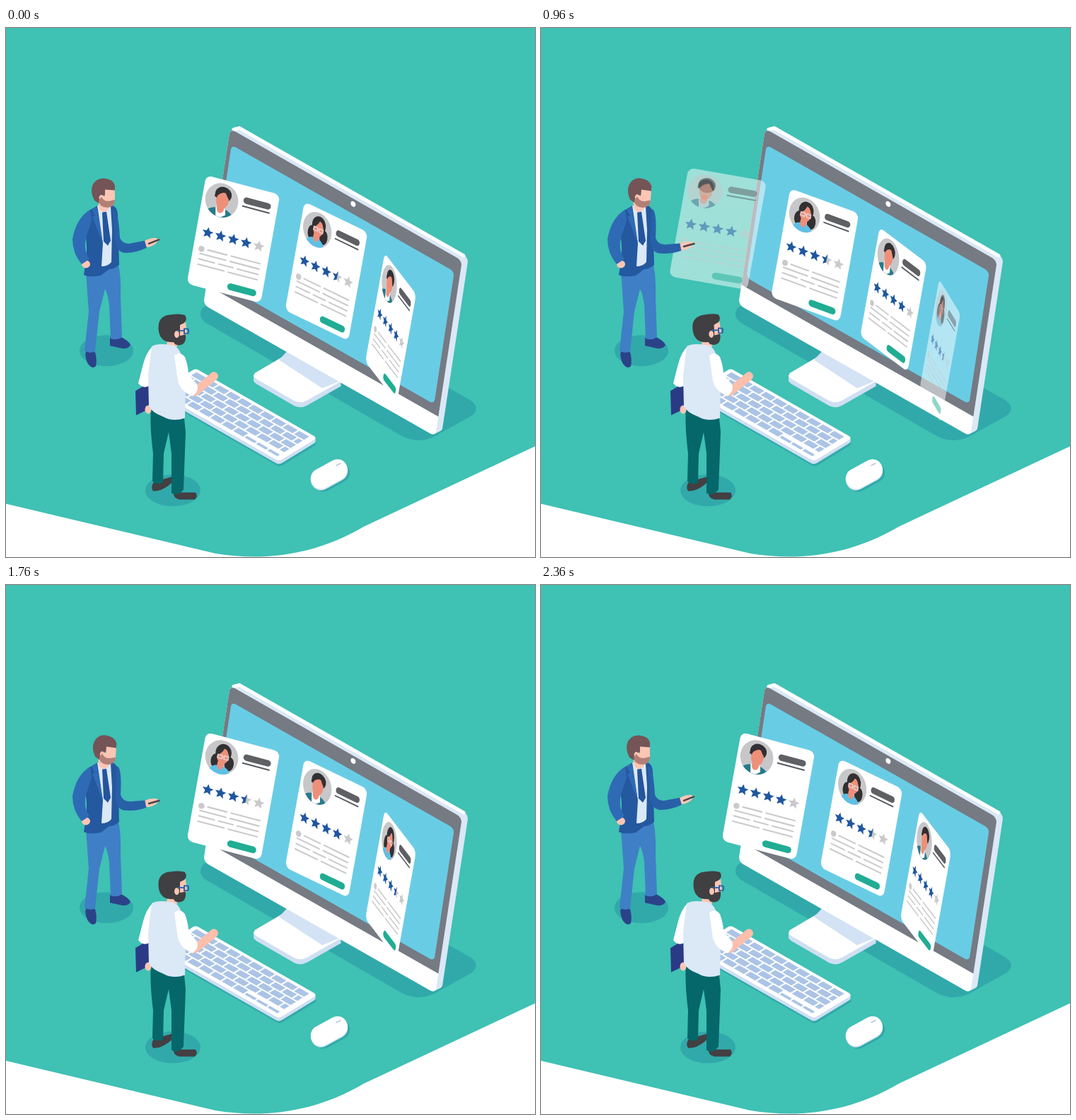
These frames come from a looping animation (748 by 748 pixels, 2.4 s). An HTML page with a canvas:

```html
<!DOCTYPE html>
<html lang="en">
<head>
<meta charset="utf-8">
<title>Choosing a candidate</title>
<style>
html, body { margin: 0; width: 100%; height: 100%; overflow: hidden; background: #fff; }
canvas { display: block; }
</style>
</head>
<body>
<canvas id="stage" width="748" height="748"></canvas>
<script>
const SIZE = 748, ART_HEIGHT = 746, LOOP = 2400, STEP = 40;
const ctx = document.getElementById('stage').getContext('2d');

const C = {
  teal: '#3fc1b4', shade: '#31a9aa', bezel: '#757a83', screen: '#69cce5',
  pale: '#dbe8f6', edge: '#cfdff2', key: '#abc4e6', skin: '#fdc6b4',
  hair: '#333033', face: '#ee8f79', star: '#1f569f', dim: '#cacacc',
  suit: '#24589f', sleeve: '#2f6bb5', green: '#20ad93'
};

// ---- Helpers ----
const clamp = x => Math.max(0, Math.min(1, x));
const mix = (a, b, p) => a + (b - a) * p;
function ease(t, from, to) {
  const p = clamp((t - from) / (to - from));
  return p * p * (3 - 2 * p);
}
function fill(d, color) {
  ctx.fillStyle = color;
  ctx.fill(new Path2D(d));
}
function stroke(d, color, width) {
  ctx.strokeStyle = color;
  ctx.lineWidth = width;
  ctx.lineCap = ctx.lineJoin = 'round';
  ctx.stroke(new Path2D(d));
}
function oval(x, y, rx, ry, color) {
  ctx.fillStyle = color;
  ctx.beginPath();
  ctx.ellipse(x, y, rx, ry, 0, 0, 7);
  ctx.fill();
}
function box(x, y, w, h, r, color) {
  ctx.fillStyle = color;
  ctx.beginPath();
  ctx.roundRect(x, y, w, h, r);
  ctx.fill();
}
function plane(matrix, draw) {
  ctx.save();
  ctx.transform(...matrix);
  draw();
  ctx.restore();
}
const shifted = (x, y, draw) => plane([1, 0, 0, 1, x, y], draw);
function turned(x, y, angle, draw) {
  ctx.save();
  ctx.translate(x, y);
  ctx.rotate(angle);
  ctx.translate(-x, -y);
  draw();
  ctx.restore();
}

// ---- Room ----
function drawBackdrop() {
  ctx.fillStyle = '#fff';
  ctx.fillRect(0, 0, SIZE, SIZE);
  fill('M0,0H748V590L506,703C436,744 364,752 296,741L0,671Z', C.teal);
}

function drawMonitor() {
  fill('M278,395Q270,407 283,416L557,574Q580,587 604,577L658,547Q672,536 657,525L600,493L300,380Z', C.shade);
  const foot = 'M353,486L404,456L474,498L426,525Q417,530 408,526L354,495Q347,490 353,486Z';
  for (let y = 7; y > 0; y--) shifted(0, y, () => fill(foot, C.edge));
  fill(foot, '#fff');
  fill('M403,450L386,468L447,508L472,498Z', '#d3e2f4');
  const face = [1, 0.567, -0.153, 1, 317, 142];
  for (let i = 9; i > 0; i--)
    shifted(i, -i * 0.5, () => plane(face, () => box(0, 0, 328, 248, 7, C.pale)));
  stroke('M322,143L330,141L647,321', '#fff', 5);
  plane(face, () => {
    box(0, 0, 328, 248, 7, '#fff');
    box(0, 0, 328, 220, [7, 7, 0, 0], C.bezel);
    box(5, 20, 315, 187, 6, C.screen);
    oval(175, 7, 3.4, 3.6, '#fff');
  });
}

function drawKeyboard() {
  const slab = color => plane([0.869, 0.495, -0.857, 0.524, 268, 480], () => box(0, 0, 198, 63, 5, color));
  shifted(1, 8, () => slab(C.shade));
  for (let y = 5; y > 0; y--) shifted(0, y, () => slab(C.edge));
  slab('#fff');
  plane([0.869, 0.495, -0.857, 0.524, 268, 480], () => {
    const pitch = 18.6;
    for (let row = 0; row < 5; row++) {
      const lead = row % 2 ? pitch / 2 : 0;
      for (let x = 6 - lead; x < 192; x += pitch) {
        const left = Math.max(6, x), right = Math.min(192, x + pitch);
        const small = row === 4 && x > 130;
        if (right - left > 4)
          box(left, 4.5 + row * 11 + (small ? 4.5 : 0), right - left - 2.4, small ? 4.2 : 8.8, 0.6, C.key);
      }
    }
  });
}

function drawMouse() {
  const body = color => plane([0.88, -0.48, 0.48, 0.88, 457, 629], () => box(-27.5, -14.5, 55, 29, 14, color));
  shifted(3, 4, () => body(C.shade));
  shifted(0, 2, () => body(C.pale));
  body('#fff');
  stroke('M467,617L473,614', '#aebfd6', 1.3);
}

// ---- Profile cards ----
// Top left corner and top edge vector at each stop.
const STOPS = [
  [134, 186.5, 116.5, 11],
  [283, 207.5, 104.5, 27.5],
  [422, 245, 89.5, 43],
  [535.5, 317.5, 44.5, 58],
  [590.5, 391, 15.5, 40]
];

function star(x, color, half) {
  ctx.fillStyle = color;
  ctx.beginPath();
  for (let i = 0; i <= (half ? 5 : 9); i++) {
    const a = -i * Math.PI / 5, r = i % 2 ? 3.6 : 7.8;
    ctx.lineTo(x + r * Math.sin(a), 75.6 - r * Math.cos(a));
  }
  ctx.fill();
}

// The portrait circle has radius 1 in these units.
function portrait(woman) {
  oval(0, 0, 1, 1, '#c7c7c9');
  ctx.clip();
  if (woman) {
    oval(0.06, -0.28, 0.48, 0.52, C.hair);
    for (const side of [-1, 1]) oval(0.08 + side * 0.42, 0.28, 0.28, 0.42, C.hair);
    oval(0, 0.98, 0.66, 0.5, '#5fbfe4');
    oval(0, 0.42, 0.2, 0.3, C.face);
    oval(0.06, -0.08, 0.36, 0.46, C.face);
    fill('M-0.36,0Q-0.4,-0.7 0.1,-0.7Q0.1,-0.3 -0.36,0ZM0.1,-0.7Q0.5,-0.6 0.46,0Q0.4,-0.3 0.1,-0.7Z', C.hair);
    stroke('M-0.25,-0.12H0.02V0.08H-0.25ZM0.14,-0.12H0.4V0.08H0.14ZM0.02,-0.04H0.14', '#e3d5d6', 0.06);
  } else {
    oval(0, 1, 0.86, 0.55, '#267a8c');
    fill('M-0.3,0.45L0.3,0.45L0.36,0.8L0.1,1L-0.2,1Z', '#fff');
    oval(0, 0.48, 0.22, 0.28, C.face);
    oval(0.04, -0.36, 0.5, 0.44, C.hair);
    oval(0.04, 0, 0.38, 0.48, C.face);
    fill('M-0.46,-0.1Q-0.5,-0.7 0.1,-0.72Q0.5,-0.6 0.48,-0.1Q0.3,-0.2 0.16,-0.5Q-0.2,-0.4 -0.3,-0.2Z', C.hair);
  }
}

function drawCard(slot, woman) {
  const alpha = clamp(Math.min(slot, 4 - slot));
  if (!alpha) return;
  const k = Math.min(3, Math.floor(slot));
  const [x, y, dx, dy] = STOPS[k].map((a, i) => mix(a, STOPS[k + 1][i], slot - k));
  ctx.globalAlpha = alpha;
  plane([dx / 100, dy / 100, -0.183, 1.02, x, y], () => {
    box(0, 0, 100, 150, 8, '#fff');
    plane([22, 0, 0, 23, 26, 27.8], () => portrait(woman));
    box(54, 15.3, 37, 8.7, 4.2, '#5e6064');
    box(53.5, 27.2, 37.5, 1.9, 0.9, '#55575b');
    for (let i = 0; i < 5; i++) {
      const sx = 15.4 + i * 17.25, half = woman && i === 3;
      star(sx, i === 4 || half ? C.dim : C.star);
      if (half) star(sx, C.star, true);
    }
    oval(11, 99, 4, 4, C.dim);
    for (let i = 0; i < 4; i++) {
      let left = i ? 9 : 18.5;
      for (const right of i === 2 ? [32, 57, 91] : [46, 91]) {
        box(left, 97.2 + i * 7.4, right - left, 2, 1, C.dim);
        left = right + 4;
      }
    }
    box(53, 134.4, 39, 9.2, 4.5, C.green);
  });
  ctx.globalAlpha = 1;
}

// ---- People ----
function drawPresenter(move) {
  oval(142, 455, 38, 22, C.shade);
  fill('M113,456Q111,462 115,472Q121,482 127,477Q129,468 126,457Z', '#2b4289');
  fill('M147,437L161,435Q174,441 176,447Q174,452 165,452L147,448Z', '#2b4289');
  fill('M113,344L159,334Q163,352 162,380L164,436Q156,441 148,438L146,390Q144,375 140,368L132,400L126,456Q118,460 111,455L117,400Z', '#3f7fc6');
  fill('M118,257L130,250H150Q157,252 158,262L160,334Q153,340 146,340L134,349Q118,352 110,348L114,322Q115,300 110,282Z', C.suit);
  fill('M129,250L148,252L150,285L149,330Q144,336 135,336L137,304Z', C.pale);
  fill('M130,244L147,248L145,256L138,260L132,256Z', C.skin);
  fill('M136,260L142,259L148,300L144,307L138,301Z', '#24559c');
  fill('M128,251L137,304L122,266L126,265L121,256Z', C.sleeve);
  oval(113, 333, 6, 5.5, C.skin);
  fill('M119,256Q99,268 94,298Q94,318 107,333L118,326Q109,313 113,296L121,272Z', C.sleeve);
  turned(162, 306, 0.105 * move, () => {
    fill('M195,301Q203,296 211,296L217,298L212,304Q204,310 198,309Z', C.skin);
    stroke('M202,304L216,298.5', '#48424a', 2.4);
    fill('M151,256Q159,256 161,296Q165,305 175,304L196,300L199,310Q182,318 166,317Q157,315 154,302Z', '#2860a8');
  });
  turned(142, 256, 0.07 * move, () => {
    fill('M125,243Q119,232 122,223Q126,212 138,212Q151,213 154,222V231H141L137,243L131,247Z', '#745457');
    fill('M140,228L154,229V243Q153,249 147,249L134,245Q129,239 134,235L140,237Z', C.skin);
    fill('M131,243L135,238Q138,245 146,244L154,242Q154,252 145,253Q132,254 131,243Z', '#b27f77');
  });
}

function drawVisitor(move) {
  oval(236, 652, 39, 22.5, C.shade);
  fill('M209,640L234,633Q238,640 230,645Q218,654 208,653Q204,648 209,640Z', '#433f43');
  fill('M237,655L268,655Q272,660 267,665H245Q236,663 237,655Z', '#433f43');
  fill('M205,536Q225,548 252,550L254,570L251,651Q243,661 234,656L234,600L230,570L223,600L222,641Q214,645 207,639L208,600Q203,560 205,536Z', '#05676a');
  fill('M183,512L203,500L207,535L184,546Z', '#2b3a85');
  oval(201, 538, 4.5, 6, C.skin);
  fill('M207,449Q198,458 194,474L187,501Q194,510 204,504L214,470Z', '#fff');
  fill('M228,438L243,444L241,452L227,450Z', C.skin);
  fill('M206,449Q216,443 238,448Q246,452 249,465L254,500L253,550Q236,556 222,548Q206,542 202,533L201,490Z', C.pale);
  stroke('M267,513L287,497L294,491', '#fbbfac', 12);
  fill('M238,462Q246,455 253,464Q258,478 258,488L271,504Q272,514 264,519Q248,514 243,498Z', '#fff');
  turned(236, 447, -0.05 * move, () => {
    fill('M245,416L254,415L256,432L250,435L243,432Z', C.skin);
    fill('M216,428Q213,409 228,405Q245,402 253,405Q257,411 252,416L246,419V434L254,432Q255,441 251,445Q246,449 239,446L237,443Q219,444 216,428Z', '#403f42');
    oval(241.5, 432, 3.4, 5, C.skin);
    stroke('M243,426.5L251,427M252,424L257.5,424.5Q259,428 257,431L252,431Z', '#2b5fa5', 1.9);
  });
}

// ---- Timeline ----
function draw(t) {
  const half = LOOP / 2, round = Math.floor(t / half);
  const slide = clamp((t % half - 760) / 400);
  ctx.setTransform(1, 0, 0, SIZE / ART_HEIGHT, 0, 0);
  drawBackdrop();
  drawMonitor();
  drawKeyboard();
  drawMouse();
  for (let i = 1; i <= 4; i++) drawCard(i - slide, (i + round) % 2 === 0);
  const lean = ease(t, 360, 680);
  drawPresenter(lean - ease(t, 1760, 2000));
  drawVisitor(lean - ease(t, 1320, 1560));
}

function tick(now) {
  draw(Math.floor(now % LOOP / STEP) * STEP);
  requestAnimationFrame(tick);
}
draw(0);
requestAnimationFrame(tick);
</script>
</body>
</html>
```
